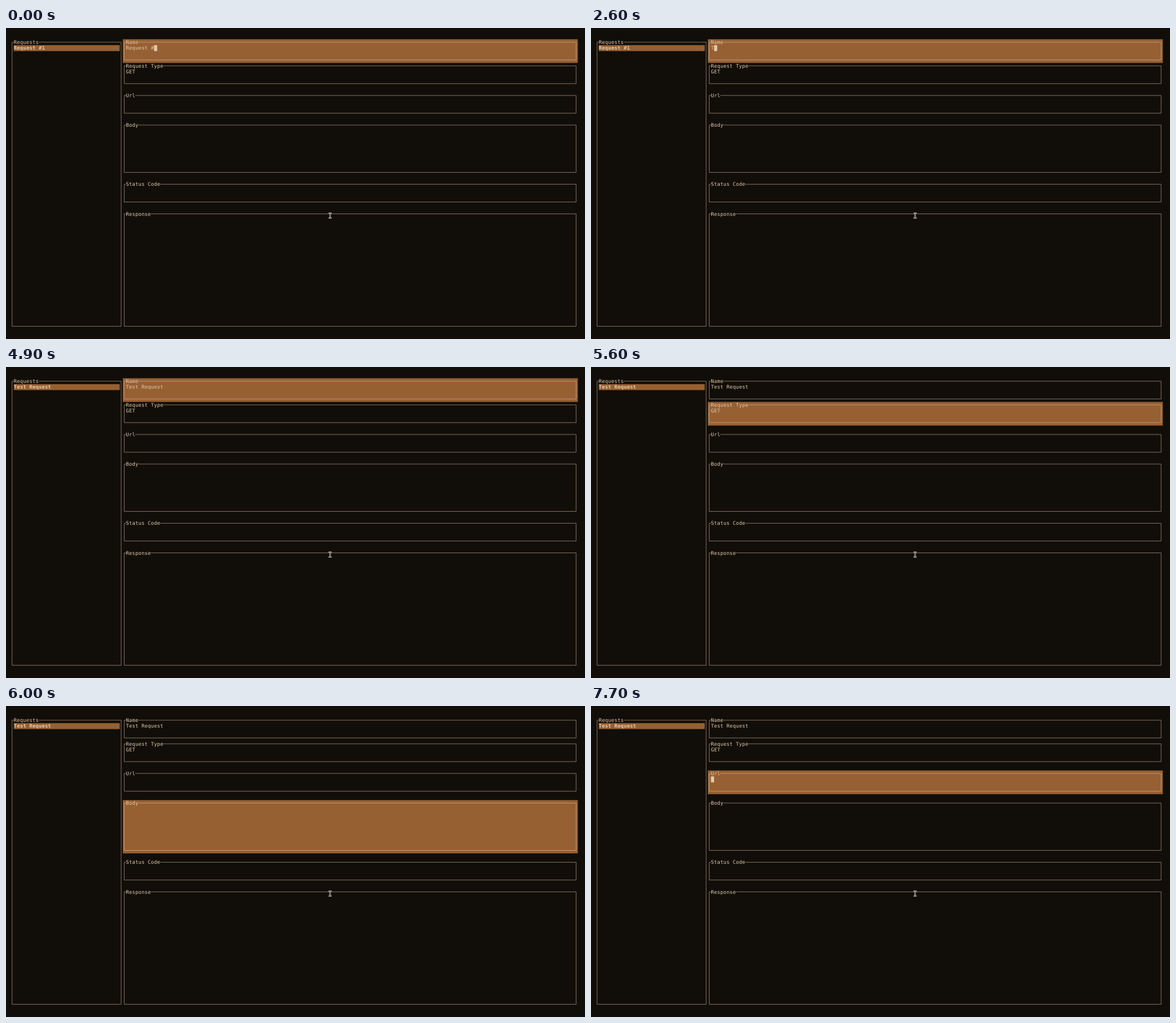
These frames come from a looping animation (1021x548 px, 8000 ms). An HTML page:

```html
<!DOCTYPE html>
<html lang="en">
<head>
<meta charset="utf-8">
<title>Request editor</title>
<style>
  html, body { margin: 0; width: 100%; height: 100%; overflow: hidden; background: #110e09; }
  svg { display: block; }
  text {
    font: 8.79px "DejaVu Sans Mono", monospace; letter-spacing: 0.203px;
    fill: #e4c9ab; white-space: pre; text-rendering: geometricPrecision;
  }
  .bold { font-weight: bold; }
  .line { fill: none; stroke: #e4c9ab; stroke-width: 0.55; }
  .mark { fill: #966033; }
  .caret { fill: #e4c9ab; }
</style>
</head>
<body>
<svg id="stage" width="1021" height="548" viewBox="0 0 1021 548"></svg>
<script>
const LOOP = 8000;
const CELL_W = 5.495, CELL_H = 10.43, LEFT = 8.24, TOP = 19.78;
const BASELINE = 8.25;
const PANE = 36, PANE_END = 181;

const stage = document.getElementById('stage');
const colX = c => LEFT + c * CELL_W;
const rowY = r => TOP + r * CELL_H;
const midX = c => colX(c + 0.45);
const midY = r => rowY(r + 0.5);

function add(tag, attrs, content = '') {
  const el = document.createElementNS('http://www.w3.org/2000/svg', tag);
  for (const key in attrs) el.setAttribute(key, attrs[key]);
  el.textContent = content;
  return stage.appendChild(el);
}

const block = (cls, col, row, cols, rows) => add('rect', {
  class: cls, x: colX(col), y: rowY(row), width: cols * CELL_W, height: rows * CELL_H
});

const label = (col, row, content, cls = '') => add('text', {
  class: cls, x: colX(col), y: rowY(row) + BASELINE
}, content);

// Bordered panel whose top edge is broken by its title.
function panel(title, c0, r0, c1, r1) {
  const x0 = midX(c0), x1 = midX(c1), y0 = midY(r0), y1 = midY(r1);
  const d = `M${colX(c0 + 1)} ${y0}H${x0}V${y1}H${x1}V${y0}H${colX(c0 + 1 + title.length)}`;
  add('path', { class: 'line', d });
  label(c0 + 1, r0, title);
}

// Title, first row, last row.
const fields = {
  name: ['Name', 0, 3],
  type: ['Request Type', 4, 7],
  url: ['Url', 9, 12],
  body: ['Body', 14, 22],
  status: ['Status Code', 24, 27],
  response: ['Response', 29, 48]
};

const focusBox = block('mark', PANE, 0, PANE_END - PANE + 1, 4);
block('mark', 1, 1, 34, 1);
panel('Requests', 0, 0, 35, 48);
for (const [title, r0, r1] of Object.values(fields)) panel(title, PANE, r0, PANE_END, r1);

const listItem = label(1, 1, '', 'bold');
const nameText = label(PANE + 1, 1, '');
label(PANE + 1, 5, 'GET');
const caret = block('caret', PANE + 1, 1, 1, 1);

// Mouse pointer.
const beam = 'M568.8 326.2H574.2M571.5 326.2V334.8M568.8 334.8H574.2';
add('path', { d: beam, fill: 'none', stroke: '#e6e3de', 'stroke-width': 2 });
add('path', { d: beam, fill: 'none', stroke: '#1c1916', 'stroke-width': 0.6 });

const OLD = 'Request #1', NEW = 'Test Request';

// Start time, text left in the name field while it is being edited.
const edits = [
  ...[9, 7, 4, 2, 0].map((n, i) => [i * 100, OLD.slice(0, n)]),
  ...[2600, 2700, 2900, 3000, 3300, 3600, 3900, 4100, 4200, 4300, 4500, 4600]
    .map((time, i) => [time, NEW.slice(0, i + 1)])
];

// Start time, focused field, caret shown.
const focus = [
  [0, 'name', true],
  [4900, 'name', false],
  [5600, 'type', false],
  [5800, 'url', false],
  [6000, 'body', false],
  [6300, 'url', false],
  [6600, 'url', true],
  [6900, 'url', false],
  [7700, 'url', true]
];

const at = (steps, t) => steps.findLast(step => step[0] <= t);

function render(t) {
  const name = at(edits, t)[1];
  const [, field, editing] = at(focus, t);
  const [, first, last] = fields[field];

  listItem.textContent = t < 4900 ? OLD : NEW;
  nameText.textContent = name;
  focusBox.setAttribute('y', rowY(first));
  focusBox.setAttribute('height', (last - first + 1) * CELL_H);

  const typed = field === 'name' ? name.length : 0;
  caret.setAttribute('x', colX(PANE + 1 + typed));
  caret.setAttribute('y', rowY(first + 1));
  caret.setAttribute('visibility', editing ? 'visible' : 'hidden');
}

const start = performance.now();
function tick() {
  render((performance.now() - start) % LOOP);
  requestAnimationFrame(tick);
}
tick();
</script>
</body>
</html>
```
